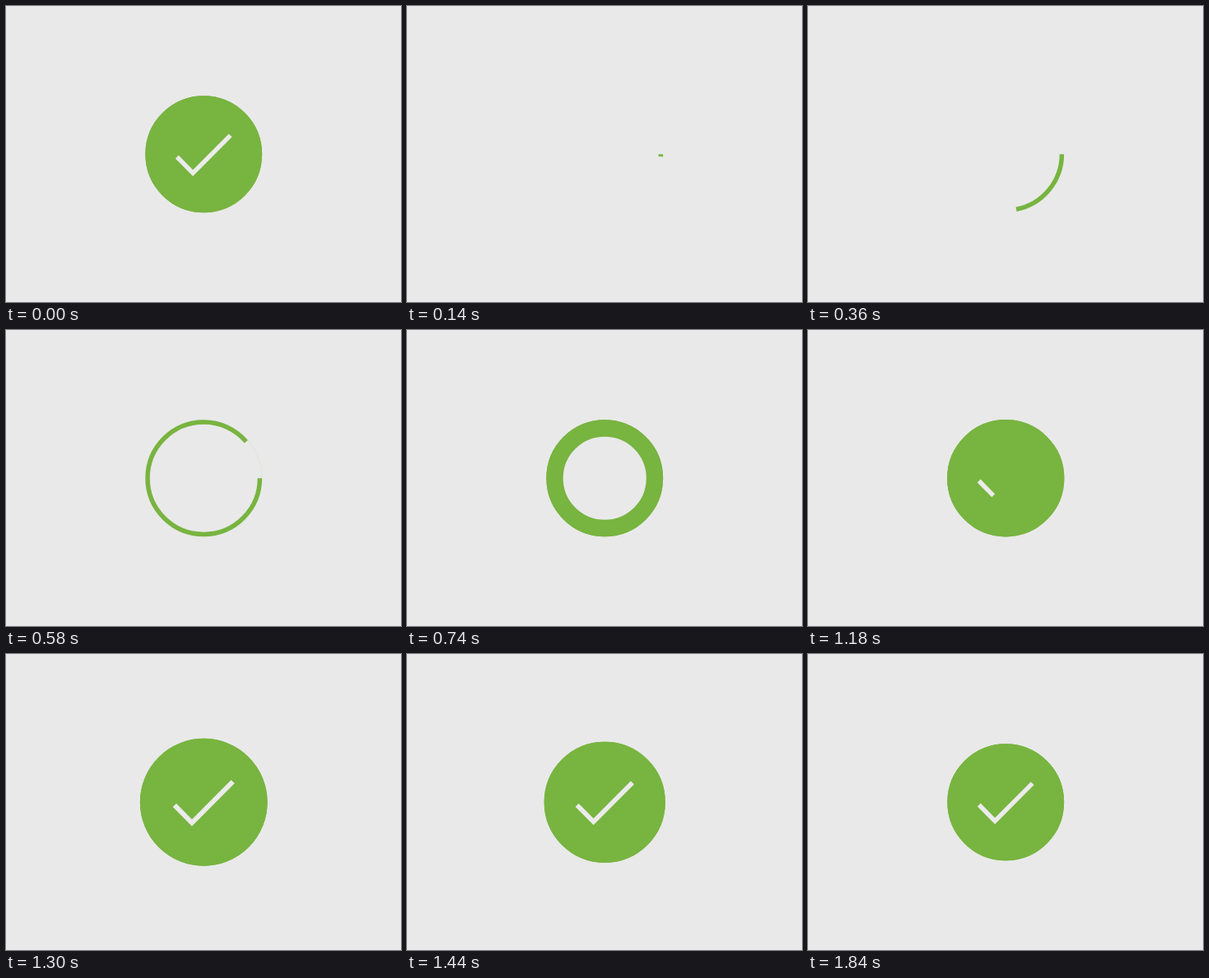
Recreate the animation shown at these times as an HTML page. Size 480x360 px, loop 1.88 s.

```html
<!DOCTYPE html>
<html lang="en">
<head>
<meta charset="utf-8">
<title>Success checkmark</title>
<style>
  html, body { margin: 0; width: 100%; height: 100%; overflow: hidden; background: #e9e9e9; }
  svg { display: block; width: 100vw; height: 100vh; }
</style>
</head>
<body>
<svg viewBox="0 0 480 360">
  <g id="badge" fill="none" stroke="#78b440" stroke-width="2" stroke-miterlimit="10">
    <circle id="ring"/>
    <path id="outline" d="M25 0A25 25 0 1 1 -25 0A25 25 0 1 1 25 0"/>
    <path id="check" stroke="#ebebeb" d="M-11.9 1.2l7.1 7.2 16.7-16.8"/>
  </g>
</svg>
<script>
  const LOOP = 1880;
  const RESET = 20;
  const UNIT = 2.727;      // pixels per badge unit
  const RADIUS = 26;
  const FILL_DEPTH = 27.86;

  const [badge, ring, outline, check] =
    ['badge', 'ring', 'outline', 'check'].map(id => document.getElementById(id));

  const clamp = v => Math.min(1, Math.max(0, v));

  // cubic-bezier(x1, 0, x2, 1)
  const bezier = (x1, x2) => x => {
    let low = 0, high = 1;
    for (let i = 0; i < 24; i++) {
      const s = (low + high) / 2;
      const at = 3 * (1 - s) * (1 - s) * s * x1 + 3 * (1 - s) * s * s * x2 + s * s * s;
      if (at < x) low = s; else high = s;
    }
    return low * low * (3 - 2 * low);
  };
  const easeDraw = bezier(0.65, 0.45);
  const easeInOut = bezier(0.42, 0.58);

  const progress = (t, start, duration) => clamp((t - start) / duration);

  function drawStroke(path, dash, amount) {
    path.setAttribute('visibility', amount > 0 ? 'visible' : 'hidden');
    path.setAttribute('stroke-dasharray', `${dash * amount} 400`);
  }

  function render(time) {
    // The finished badge is held briefly before the loop clears.
    const t = time < RESET ? LOOP : time;

    drawStroke(outline, 166, easeDraw(progress(t, 78, 720)));
    drawStroke(check, 48, easeDraw(progress(t, 1044, 360)));

    const fill = progress(t, 569, 480);
    const depth = Math.min(RADIUS, FILL_DEPTH * easeInOut(fill));
    ring.setAttribute('visibility', fill > 0 ? 'visible' : 'hidden');
    ring.setAttribute('r', RADIUS - depth / 2);
    ring.setAttribute('stroke-width', depth);

    const pulse = progress(t, 1158, 360);
    const swell = easeInOut(pulse < 0.5 ? pulse * 2 : 1 - (pulse * 2 - 1));
    badge.setAttribute('transform',
      `translate(240.25 180.25) scale(${UNIT * (1 + 0.1 * swell)})`);
  }

  const begin = performance.now();
  function tick() {
    render((performance.now() - begin) % LOOP);
    requestAnimationFrame(tick);
  }
  tick();
</script>
</body>
</html>
```
